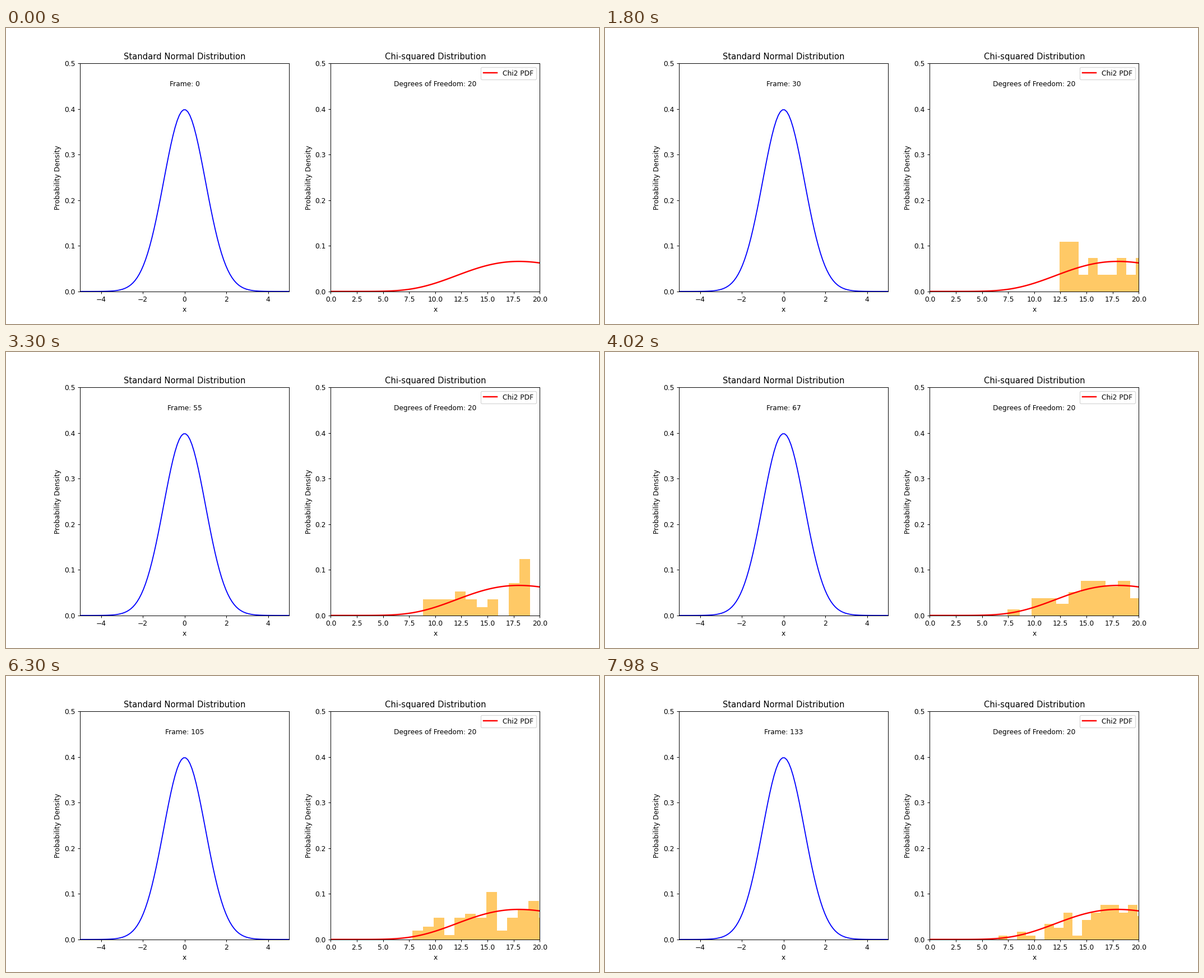
Write a matplotlib script that moves like this. It is 1058 by 529 pixels and loops after 8000 ms.

```python
import math

import matplotlib.pyplot as plt
import numpy as np
from matplotlib.animation import FuncAnimation

LOOP_MS = 8000
TICK_MS = 40
STEP_MS = 60  # a new sample is drawn this often
DOF = 20
BINS = 30


def normal_pdf(x):
    return np.exp(-x**2 / 2) / math.sqrt(2 * math.pi)


def chi2_pdf(x, k):
    return x**(k / 2 - 1) * np.exp(-x / 2) / (2**(k / 2) * math.gamma(k / 2))


def histogram(n):
    """Density histogram of n fresh chi-squared values, seeded by n."""
    if n == 0:
        return np.zeros(BINS), np.linspace(0, 20, BINS + 1)
    sample = np.random.default_rng(n).chisquare(DOF, n)
    return np.histogram(sample, bins=BINS, density=True)


def style_axes(ax, title, xlim):
    ax.set_title(title)
    ax.set_xlabel("x")
    ax.set_ylabel("Probability Density")
    ax.set_xlim(*xlim)
    ax.set_ylim(0, 0.5)


# 12 x 6 inches, scaled to 1058 x 529 pixels
fig, (ax_norm, ax_chi) = plt.subplots(1, 2, figsize=(12, 6), dpi=1058 / 12)

x = np.linspace(-5, 5, 100)
ax_norm.plot(x, normal_pdf(x), color="blue")
style_axes(ax_norm, "Standard Normal Distribution", (-5, 5))
counter = ax_norm.text(0, 0.45, "", ha="center")

x = np.linspace(0, 20, 100)
bars = ax_chi.stairs(*histogram(0), fill=True, color="orange", alpha=0.6)
ax_chi.plot(x, chi2_pdf(x, DOF), color="red", lw=2, label="Chi2 PDF")
style_axes(ax_chi, "Chi-squared Distribution", (0, 20))
ax_chi.text(10, 0.45, f"Degrees of Freedom: {DOF}", ha="center")
ax_chi.legend(loc="upper right")


def update(tick):
    n = (tick * TICK_MS + STEP_MS - TICK_MS) // STEP_MS
    counter.set_text(f"Frame: {n}")
    bars.set_data(*histogram(n))
    return counter, bars


anim = FuncAnimation(fig, update, frames=LOOP_MS // TICK_MS,
                     interval=TICK_MS, repeat=True, repeat_delay=0)
plt.show()
```
